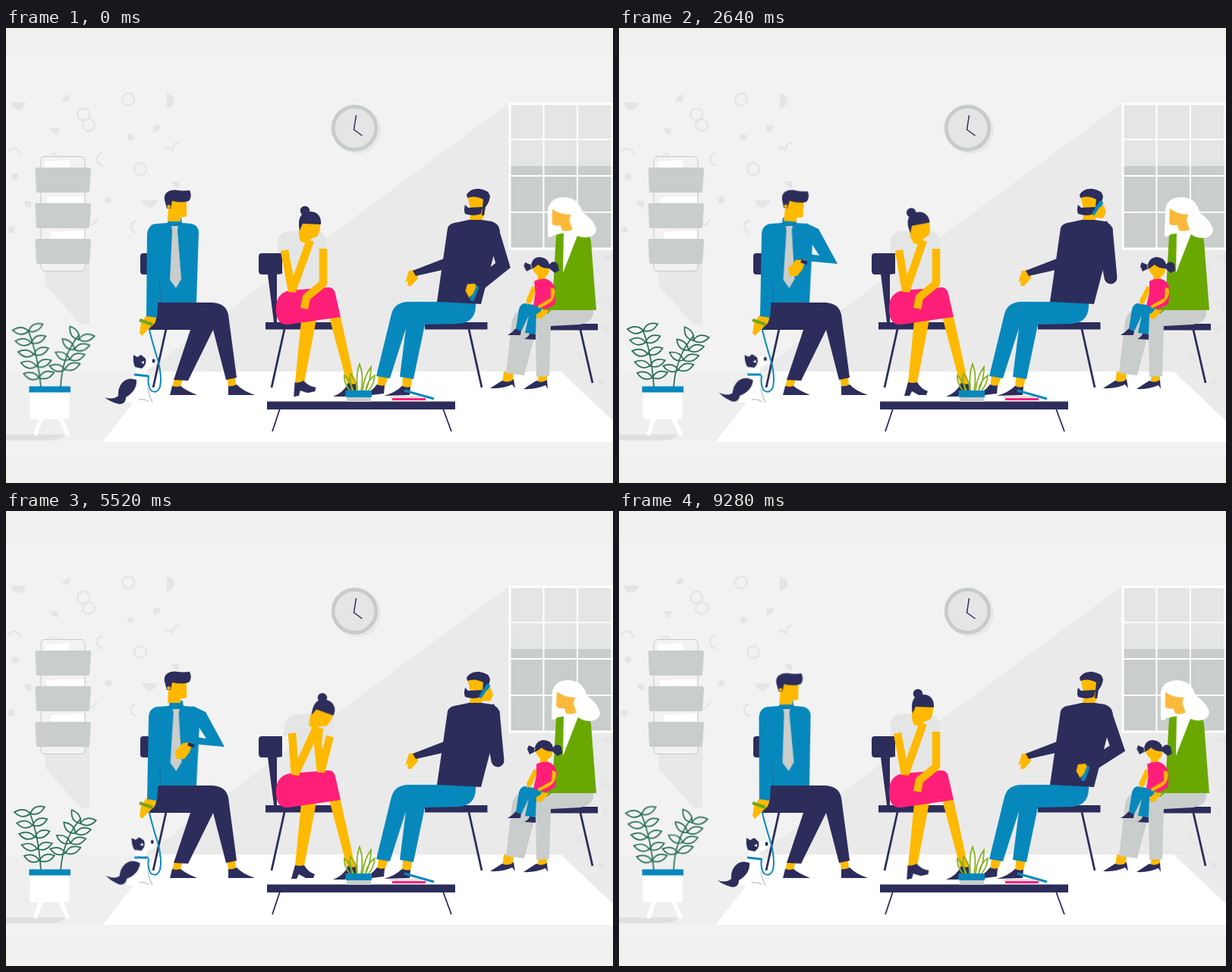
Recreate the animation shown at these times as an HTML page. Size 800x600 px, loop 9320 ms.

```html
<!DOCTYPE html>
<html lang="en">
<head>
<meta charset="utf-8">
<title>Waiting room</title>
<style>
html, body { margin: 0; width: 100%; height: 100%; overflow: hidden; background: #f0f0ee; }
svg { display: block; width: 100vw; height: 100vh; }
.navy { fill: #2c2d5b; } .skin { fill: #ffb900; } .blue { fill: #0788bc; }
.pink { fill: #ff1f78; } .grey { fill: #c9cdcc; } .pale { fill: #e4e6e5; }
.white { fill: #fff; } .green { fill: #68a800; }
.line { fill: none; stroke: #2c2d5b; }
.bits { fill: #e5e5e5; }
.bits .o { fill: none; stroke: #e5e5e5; stroke-width: 2.4; }
.limb { fill: none; stroke: #ffb900; stroke-width: 10.5; stroke-linejoin: bevel; }

/* The scene plays forwards, then backwards */
[class*="m-"] { animation: 4660ms ease-in-out infinite alternate; }

.m-torso { animation-name: torso; transform-origin: 225px 362px; }
@keyframes torso {
  0% { transform: skewX(0deg); animation-timing-function: ease-out; }
  10%, 40% { transform: skewX(6.7deg); }
  52%, 100% { transform: skewX(-1deg); }
}
.m-face { animation-name: face; transform-origin: 222px 254px; }
@keyframes face {
  0% { transform: none; animation-timing-function: ease-out; }
  10%, 40% { transform: translate(-12px, 2px); }
  52%, 62% { transform: translate(4px, 0) rotate(4deg); }
  74%, 100% { transform: translate(0, -2px); }
}
.m-sleeve { animation-name: sleeve; }
@keyframes sleeve {
  0% { d: path("M186 272Q187 260 197 258L206 268L199 382L185 380Z"); animation-timing-function: ease-out; }
  10%, 40% { d: path("M175 272Q176 262 186 260L196 268L198 382L184 380Z"); }
  52%, 100% { d: path("M188 272Q189 260 199 258L208 268L199 382L186 380Z"); }
}
.m-watcharm { animation-name: watcharm; }
@keyframes watcharm {
  0% { d: path("M236 258L250 266L249 318L240 345L232 343L238 315L240 285Z"); animation-timing-function: ease-out; }
  10%, 40% { d: path("M226 259L238 268L245 318L236 345L228 343L234 315L234 285Z"); }
  52%, 100% { d: path("M246 257L263 265L288 311L245 307L243 297L264 300L251 280Z"); }
}
.m-watchhand { animation-name: watchhand; }
@keyframes watchhand {
  0%, 44% { transform: translate(4px, 28px); opacity: 0; }
  45% { transform: translate(3px, 22px); opacity: 1; }
  52%, 100% { transform: none; opacity: 1; }
}
.m-tail { animation-name: tail; transform-origin: 165px 488px; }
@keyframes tail { 0%, 33% { transform: none; } 50%, 100% { transform: translate(1px, -1px) rotate(9deg); } }
.m-doghead { animation-name: doghead; transform-origin: 178px 455px; }
@keyframes doghead { 0%, 33% { transform: none; } 50%, 100% { transform: translateY(-1px) rotate(-6deg); } }

.m-bun { animation-name: bun; transform-origin: 396px 285px; }
@keyframes bun {
  0% { transform: none; }
  13%, 34% { transform: rotate(-15deg); }
  50%, 66% { transform: translate(1px, 1px) rotate(-13deg); }
  80%, 100% { transform: translate(10px, 4px) rotate(17deg); }
}
.m-top { animation-name: top; transform-origin: 390px 348px; }
@keyframes top { 0%, 66% { transform: none; } 80%, 100% { transform: skewX(-8deg); } }
.m-chinarm { animation-name: chinarm; }
@keyframes chinarm {
  0%, 34% { d: path("M367 293L377 347L401 280"); }
  50%, 66% { d: path("M369 293L378 347L401 280"); }
  80%, 100% { d: path("M377 293L381 347L409 286"); }
}
.m-laparm { animation-name: laparm; }
@keyframes laparm {
  0%, 66% { d: path("M418 291L418 337L396 355L393 370"); }
  80%, 100% { d: path("M427 297L415 344L411 306L413 286"); }
}
.m-foot { animation-name: foot; transform-origin: 383px 470px; }
@keyframes foot { 0% { transform: rotate(-12deg); } 12%, 100% { transform: none; } }

.m-phonearm { animation-name: phonearm; }
@keyframes phonearm {
  0% { d: path("M641 266L655 313L619 342"); stroke-linejoin: miter; animation-timing-function: linear; }
  .86% { d: path("M641 266L657 313L616 339"); stroke-linejoin: miter; animation-timing-function: ease-in; }
  7% { d: path("M642 266L661 313L608 294"); stroke-linejoin: round; animation-timing-function: ease-out; }
  15%, 100% { d: path("M642 264L648 329L635 256"); stroke-linejoin: round; }
}
.m-phone { animation-name: phone; transform-origin: 634px 240px; }
@keyframes phone {
  0% { transform: translate(-20px, 108px) rotate(170deg); animation-timing-function: linear; }
  .86% { transform: translate(-23px, 104px) rotate(168deg); animation-timing-function: ease-in; }
  7% { transform: translate(-30px, 48px) rotate(70deg); animation-timing-function: ease-out; }
  15%, 100% { transform: none; }
}

.m-elder { animation-name: elder; transform-origin: 745px 268px; }
@keyframes elder { 0%, 1% { transform: translate(-5px, 0) rotate(-2deg); } 18%, 100% { transform: none; } }
.m-girl { animation-name: girl; transform-origin: 705px 366px; }
@keyframes girl { 0%, 1% { transform: skewX(5deg); } 18%, 100% { transform: none; } }
.m-plant { animation-name: plant; transform-origin: 58px 474px; }
@keyframes plant { 0% { transform: rotate(-1.7deg); } 20%, 100% { transform: none; } }
</style>
</head>
<body>
<svg viewBox="0 0 800 600" preserveAspectRatio="none">
  <!-- room -->
  <path fill="#f2f2f2" d="M0 38H800V565H0Z"/>
  <path fill="#eaeaea" d="M663 99L184 453H800V99Z"/>
  <path fill="#efefef" d="M0 453H800V545H0Z"/>
  <path fill="#ebebeb" d="M735 453H800V545H735Z"/>
  <path class="white" d="M200 453H731L800 518V546H127Z"/>

  <g class="bits">
    <path d="M6 98H26Q24 108 16 108Q8 108 6 98M74 97Q76 88 85 88L84 97ZM212 86Q222 88 222 96Q222 103 212 106ZM58 132H69L68 141Q61 140 58 132M194 128H204Q203 137 195 138ZM179 227H199Q197 236 189 237Q181 235 179 227M23 228H33V238Q25 236 23 228M218 202H228V211Q220 210 218 202M785 299H800V307Q789 308 785 299"/>
    <circle cx="164" cy="144" r="4.5"/><circle cx="12" cy="196" r="4.5"/><circle cx="135" cy="227" r="4.5"/>
    <circle cx="7" cy="266" r="4.5"/><circle cx="790" cy="397" r="4.5"/><circle cx="784" cy="467" r="4.5"/>
    <g class="o">
      <circle cx="161" cy="94" r="8"/><circle cx="102" cy="114" r="8"/><circle cx="109" cy="128" r="8"/><circle cx="177" cy="186" r="8"/>
      <path d="M3 165Q5 158 12 159Q18 160 19 166M127 165Q119 167 120 174Q121 181 128 181M173 254Q164 256 165 263Q166 270 173 270M210 161Q213 154 217 159Q220 163 221 156Q223 149 228 152M58 168Q62 163 66 168T74 169M110 258Q114 262 116 257T121 254M783 362Q791 356 797 365V374M750 427Q756 428 755 433T762 438"/>
    </g>
  </g>

  <!-- wall rack -->
  <path fill="#e8e8e8" d="M52 300H110V391H98L52 339Z"/>
  <rect x="46" y="169.500" width="58" height="151" rx="5" fill="#f2f2f2" stroke="#c5c9c9"/>
  <path class="white" d="M51 176L84 174V185H51ZM54 223L103 222V232H54ZM59 269L103 267V279H59Z"/>
  <path id="pocket" class="grey" d="M41 184H109Q112 184 112 187L110 215Q110 217 108 217H42Q40 217 40 215L38.500 187Q38.500 184 41 184Z"/>
  <use href="#pocket" y="47"/><use href="#pocket" y="94"/>

  <!-- clock -->
  <circle cx="463" cy="135" r="31" fill="#e8e8e8"/>
  <circle class="pale" cx="459.500" cy="132" r="28.300" stroke="#c7cbcb" stroke-width="4.800"/>
  <path class="line" stroke-width="1.500" d="M461.500 115L458.500 134L469.500 142"/>

  <!-- window -->
  <path class="pale" d="M664 100H800V182H664Z"/>
  <path class="grey" d="M664 182H800V291H664Z"/>
  <path fill="none" stroke="#fff" stroke-width="3" d="M800 100H664V291H800"/>
  <path fill="none" stroke="#fff" stroke-width="2" d="M708.500 100V291M753 100V291M798.500 100V291M664 147H800M664 195H800M664 243H800"/>

  <!-- floor plant -->
  <path fill="#dfdfdf" d="M0 536H78Q74 543 60 543.500H0Z"/>
  <path stroke="#fff" stroke-width="5.500" stroke-linecap="round" d="M46 515L39 535M72 515L81 535"/>
  <g class="m-plant" id="plant" fill="none" stroke="#276e57" stroke-width="1.700">
    <path d="M46 474Q43 428 31 397M72 474Q75 432 99 405"/>
  </g>
  <path class="white" d="M31.500 480H83.500V513Q83.500 516 80 516H35Q31.500 516 31.500 513Z"/>
  <path class="blue" d="M30.500 472.500H85V480.500H30.500Z"/>

  <!-- chairs -->
  <g class="navy">
    <path d="M188 297H181Q177 297 177 301V321Q177 325 181 325H188ZM188 388H245V398H188Z"/>
    <path d="M337 297H364V324L357 325V388H353L345 325H337Q333 325 333 320V301Q333 297 337 297M342 388H440V397.500H342Z"/>
    <path d="M552 388H634.500V397.500H552ZM716 390H780V398.500H716Z"/>
  </g>
  <path class="line" stroke-width="2.800" d="M211 397L194 474M367 397L350 474M610 397L627 474M757 398L773 468"/>

  <!-- dog -->
  <path class="white" d="M170 455H187Q191 475 194 494H158Q160 470 170 455Z"/>
  <path class="navy m-tail" d="M130 487Q141 491 148 485Q147 470 158 464Q164 461 172 464Q173 478 158 487Q158 496 149 496Q137 493 130 487Z"/>
  <path fill="none" stroke="#c9cdcc" stroke-width="1.600" d="M187 475Q189 486 193 494M175 490Q184 489 188 493"/>
  <g class="m-doghead">
    <path class="white" d="M172 446Q184 432 196 436Q199 443 194 446L186 449V458H171Z"/>
    <path class="navy" d="M168 431L173 434L178 431L184 436Q186 444 179 449L170 447Q167 441 168 431Z"/>
    <path class="white" d="M178 441L182 439V443Z"/>
    <ellipse class="navy" cx="194.500" cy="439" rx="2" ry="2.700"/>
    <path stroke="#0788bc" stroke-width="3.200" d="M169 457L187 459"/>
  </g>
  <path fill="none" stroke="#0788bc" stroke-width="2" d="M187 390Q193 416 200 437Q206 460 203 473Q199 483 191 478Q186 471 188 458"/>

  <!-- man with the dog -->
  <path class="skin" d="M222 462H233L230 473H219ZM291 460H302L303 472H293Z"/>
  <path class="navy" d="M216 484L219 472Q225 474 230 472Q237 478 252 484ZM293 484V472Q299 473 304 470Q311 478 328 484Z"/>
  <path class="navy" d="M196 362H272Q290 363 293 378L304 461L290 464L273 398L240 465L221 464L243 398H196Z"/>
  <path class="skin" d="M185 379H198Q199 389 191 394L186 399L179 406L176 402L178 389Z"/>
  <path stroke="#75a51a" stroke-width="4.500" d="M176 385L193 391"/>
  <g class="m-torso">
    <path class="blue" d="M187 270Q188 259 200 258L213 257L214 250H231L232 257L244 258Q254 260 254 270L251 362H199Z"/>
    <path class="grey" d="M218 261H227L226 267L231 331L224 343L216 332L219 267Z"/>
    <path fill="none" stroke="#156a98" stroke-width=".9" d="M204 274L201 320L204 362M213 257L221 261L232 257"/>
  </g>
  <path class="blue m-sleeve" d="M186 272Q187 260 197 258L206 268L199 382L185 380Z"/>
  <g class="m-face">
    <path class="skin" d="M216 226H238V247Q238 250 230 249V255H213L214 237Z"/>
    <path class="navy" d="M209 227Q207 214 223 213.500Q232 215 242 214Q246 222 241 228Q232 231 219 228L217 238H212Z"/>
    <circle class="skin" cx="214.500" cy="235.500" r="2.300"/>
  </g>
  <g class="m-watchhand">
    <path class="skin" d="M223 317L233 306L246 305L242 318L235 327H225Z"/>
    <path stroke="#2c2d5b" stroke-width="5" d="M240 307L248 310"/>
  </g>
  <path class="blue m-watcharm" d="M236 258L250 266L249 318L240 345L232 343L238 315L240 285Z"/>

  <!-- tired woman -->
  <path class="skin" d="M389 386L409 384L393 468H381ZM426 381H441L461 473L450 471Z"/>
  <path class="navy m-foot" d="M381 467Q387 469 393 467Q398 476 407 479L405 484H395L386 479L383 485H376Z"/>
  <path class="navy" d="M451 468Q456 471 461 469L463 486H460L457 480L446 486H431Q445 481 451 468Z"/>
  <path class="pale m-top" d="M358 297V281Q360 268 373 268L409 267Q421 269 423 281V294L413 297L414 348H372L371 293Z"/>
  <path class="pink" d="M356 374Q354 350 374 346L425 342Q432 342 434 350L441 381L372 391Q357 392 356 374Z"/>
  <g class="m-bun">
    <path class="skin" d="M388 256H414Q415 268 410 275L402 278L397 285L388 281Q384 270 388 256Z"/>
    <path class="navy" d="M387 267Q384 252 390 246Q397 240 407 243Q416 247 415 259L391 258Z"/>
    <circle class="navy" cx="394" cy="241" r="6.200"/>
  </g>
  <path class="limb m-chinarm" d="M367 293L377 347L401 280"/>
  <path class="limb m-laparm" d="M418 291L418 337L396 355L393 370"/>

  <!-- man with the phone -->
  <path class="skin" d="M491 458H505L499 473H489ZM523 460H536L533 475H522Z"/>
  <path class="navy" d="M489 470Q494 473 499 471L498 482L466 486Q481 481 489 470M522 472Q528 475 533 473L532 484L498 485Q513 481 522 472Z"/>
  <path class="blue" d="M529 361H619Q621 388 597 390L552 391L537 463L519 460L527 396L506 462L488 459L508 377Q512 362 529 361Z"/>
  <path class="skin" d="M541 319L531 320L526 336L530 333L529 340L534 340L543 330Z"/>
  <path class="navy" d="M580 303V318L540 327L536 320Z"/>
  <path class="skin" d="M608 220H631V246L625 256H610L613 244Z"/>
  <path class="navy" d="M582 264Q584 257 596 256L610 253H627L640 255Q650 258 651 268L626 364L568 361Z"/>
  <path class="navy" d="M607 220Q612 211 624 212Q637 214 638 222Q637 230 632 236L630 247H627L629 226Q618 220 608 224ZM605 233L609 237L628 236L626 245Q616 249 605 245Q603 240 605 233Z"/>
  <path class="line m-phonearm" stroke-width="17" d="M641 266L655 313L619 342"/>
  <g class="m-phone">
    <path stroke="#0788bc" stroke-width="6" stroke-linecap="round" d="M635 231L627 244"/>
    <path class="skin" d="M633 237L639 233L642 243L638 251L628 250L627 246Z"/>
  </g>

  <!-- older woman -->
  <path class="skin" d="M656 453H669L668 468H654ZM702 457H713V470H700Z"/>
  <path class="navy" d="M638 475L654 465Q662 469 669 463L671 475L667 470Q656 476 638 475M682 476L699 465Q706 469 713 464L714 476L711 471Q698 477 682 476Z"/>
  <path class="grey" d="M682 371H774Q776 388 756 391L718 393L716 459L699 460L698 401L683 458L659 455L667 386Q671 372 682 371Z"/>
  <path class="white" d="M732 266H758L757 324H731Z"/>
  <path class="green" d="M725 274Q730 268 735 270L734 323L755 269Q769 269 771 281L778 372H719L713 377L706 370L721 345Z"/>
  <g class="m-elder">
    <path class="white" d="M719 274Q719 262 720 247Q718 231 730 225Q744 220 757 228Q763 234 766 244Q780 254 783 266Q782 277 768 277Q757 276 750 269L727 272Q722 277 719 274Z"/>
    <path fill="#fbb93c" d="M726 238Q736 246 750 246L748 254L752 266Q745 269 738 267L736 260Q727 261 725 257Z"/>
  </g>

  <!-- girl -->
  <path class="skin" d="M716 372L699 371L695 381L705 384Z"/>
  <path class="navy" d="M661 405Q668 401 672 396L679 399L678 405ZM683 410Q688 408 691 402L698 404V411Z"/>
  <path class="blue" d="M683 363L707 367Q706 375 699 377L698 404L684 402L689 379L679 400L672 397L676 371Q678 364 683 363Z"/>
  <g class="m-girl">
    <path class="skin" d="M696 340L701 343L693 362L687 365L686 359ZM704 324H714V335H704Z"/>
    <path class="pink" d="M699 334Q705 330 715 331Q724 334 726 345L724 364L712 371L695 366L699 349Z"/>
    <path class="skin" d="M720 342L725 344Q726 358 714 364L702 370L701 366L719 356Z"/>
    <path class="skin" d="M697 312H720Q722 325 713 328Q699 329 697 312Z"/>
    <path class="navy" d="M696 318Q697 303 708 302Q719 302 721 312Q726 305 732 311L733 320L727 323L720 317Q710 317 706 312Q700 317 696 318M698 313L689 309L687 314L690 321L696 318Z"/>
  </g>

  <!-- coffee table -->
  <path class="line" stroke-width="1.800" d="M361 502L351 532M576 502L587 532"/>
  <path class="navy" d="M344 492.500H592V503H344Z"/>
  <g fill="none" stroke="#86b01f" stroke-width="1.800">
    <path d="M453 478Q445 468 446 458Q455 466 456 478M458 478Q451 464 454 456Q463 466 462 478M463 478Q461 455 466 443Q472 458 468 478M470 478Q472 459 481 447Q481 464 474 478M474 478Q476 465 486 458Q485 470 478 478"/>
  </g>
  <path class="blue" d="M447.500 478H482V487H447.500Z"/>
  <path class="grey" d="M449 487H481V493H449Z"/>
  <path fill="none" stroke="#c9cdcc" stroke-width="1.500" d="M506 486.500H546"/>
  <path fill="none" stroke="#ff1f78" stroke-width="3" d="M509 489.500H553"/>
  <path fill="none" stroke="#0788bc" stroke-width="3" d="M525 478L564 489"/>
</svg>
<script>
const plant = document.getElementById("plant");

function addLeaf(x, y, angle) {
  const leaf = document.createElementNS("http://www.w3.org/2000/svg", "path");
  leaf.setAttribute("d", "M0 0Q9 -10 21 -1Q10 8 0 0Z");
  leaf.setAttribute("transform", `translate(${x} ${y}) rotate(${angle})`);
  plant.append(leaf);
}

// Pairs of leaves climb each stem
for (let i = 0; i < 5; i++) {
  const y = 399 + i * 15.5;
  addLeaf(32 + i * 3, y, 188 + i * 3);
  addLeaf(32 + i * 3, y, -22 + i * 1.5);
}
for (let i = 0; i < 4; i++) {
  const x = 98 - i * 6.5, y = 412 + i * 13;
  addLeaf(x, y, -120 - i * 14);
  addLeaf(x, y, -8 - i * 3);
}
</script>
</body>
</html>
```
